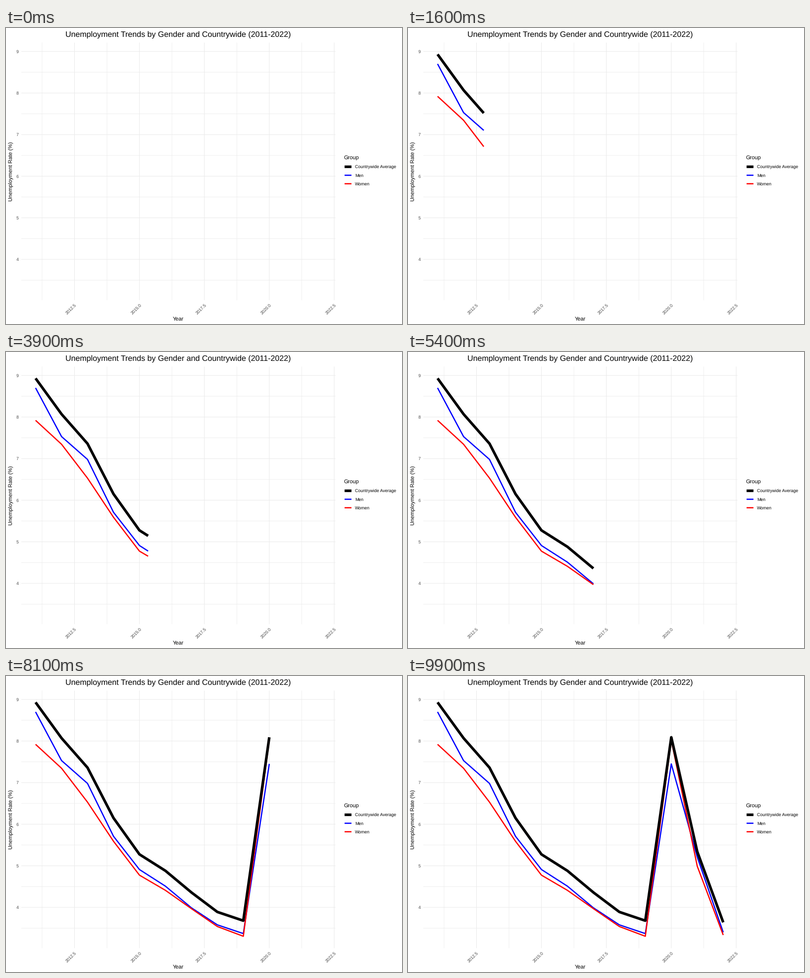
Recreate the animation shown at these times as a matplotlib script. Size 800x600 px, loop 10000 ms.

```python
import numpy as np
import matplotlib.pyplot as plt
from matplotlib.animation import FuncAnimation

plt.rcParams["font.family"] = "Liberation Sans"
plt.rcParams["text.hinting"] = "none"

W, H, DPI = 800, 600, 100
FRAMES, INTERVAL = 100, 100
PT = 72 / DPI  # points per pixel

LEFT, RIGHT, TOP, BOTTOM = 30.9, 665.6, 29.6, 551.7
GRID, TICK = "#EBEBEB", "#4D4D4D"

YEARS = np.arange(2011, 2023)
# name, colour, line width in px, yearly rates; listed in drawing order
SERIES = [
    ("Men", "#0000FF", 2.5,
     [8.70, 7.53, 6.98, 5.71, 4.91, 4.51, 3.99, 3.58, 3.37, 7.45, 5.21, 3.40]),
    ("Women", "#FF0000", 2.5,
     [7.92, 7.345, 6.53, 5.59, 4.775, 4.41, 3.97, 3.54, 3.305, 8.02, 4.99, 3.335]),
    ("Countrywide Average", "#000000", 5.33,
     [8.93, 8.07, 7.36, 6.15, 5.275, 4.88, 4.36, 3.89, 3.68, 8.09, 5.34, 3.64]),
]
LEGEND_Y = {"Countrywide Average": 281.3, "Men": 298.5, "Women": 315.7}


def px(year):
    return 59.75 + 52.46 * (np.asarray(year) - 2011)


def py(rate):
    return 47.5 + 84.3 * (9 - np.asarray(rate))


fig = plt.figure(figsize=(W / DPI, H / DPI), dpi=DPI, facecolor="white")
ax = fig.add_axes([0, 0, 1, 1])
ax.set_xlim(0, W)
ax.set_ylim(H, 0)
ax.axis("off")


def stroke(xs, ys, color, width, z=1):
    line, = ax.plot(xs, ys, color=color, lw=width * PT, zorder=z, snap=False,
                    solid_capstyle="butt", solid_joinstyle="round")
    return line


def label(x, y, s, size, color="black", ha="left", angle=0):
    ax.text(x, y, s, fontsize=size * PT, color=color, ha=ha, va="baseline",
            rotation=angle, rotation_mode="anchor")


def draw_grid():
    for year in np.arange(2011.25, 2022, 2.5):
        stroke([px(year)] * 2, [TOP, BOTTOM], GRID, 0.8)
    for rate in np.arange(3.5, 9):
        stroke([LEFT, RIGHT], [py(rate)] * 2, GRID, 0.8)
    for year in np.arange(2012.5, 2023, 2.5):
        x = px(year)
        stroke([x, x], [TOP, BOTTOM], GRID, 1.07)
        label(x - 5, 571.2, f"{year:.1f}", 8.8, TICK, "center", 45)
    for rate in range(4, 10):
        y = py(rate)
        stroke([LEFT, RIGHT], [y, y], GRID, 1.07)
        label(25.8, y + 3.3, str(rate), 8.8, TICK, "right")


def draw_labels():
    label(348.2, 18, "Unemployment Trends by Gender and Countrywide (2011-2022)",
          16, ha="center")
    label(348.2, 593, "Year", 11, ha="center")
    label(13.5, 290.6, "Unemployment Rate (%)", 11, ha="center", angle=90)
    label(682.2, 266, "Group", 11)
    for name, color, width, _ in SERIES:
        y = LEGEND_Y[name]
        stroke([684, 697.9], [y, y], color, width)
        label(704.8, y + 3.3, name, 8.8)


draw_grid()
draw_labels()
lines = [stroke([], [], color, width, z=3 + i)
         for i, (_, color, width, _) in enumerate(SERIES)]


def update(frame):
    now = 2011 + 11 * frame / (FRAMES - 1)
    years = np.append(YEARS[YEARS < now - 1e-6], now)
    for line, (*_, rates) in zip(lines, SERIES):
        if frame == 0:
            line.set_data([], [])
        else:
            line.set_data(px(years), py(np.interp(years, YEARS, rates)))
    return lines


anim = FuncAnimation(fig, update, frames=FRAMES, interval=INTERVAL,
                     repeat=True, repeat_delay=0, blit=False)
plt.show()
```
